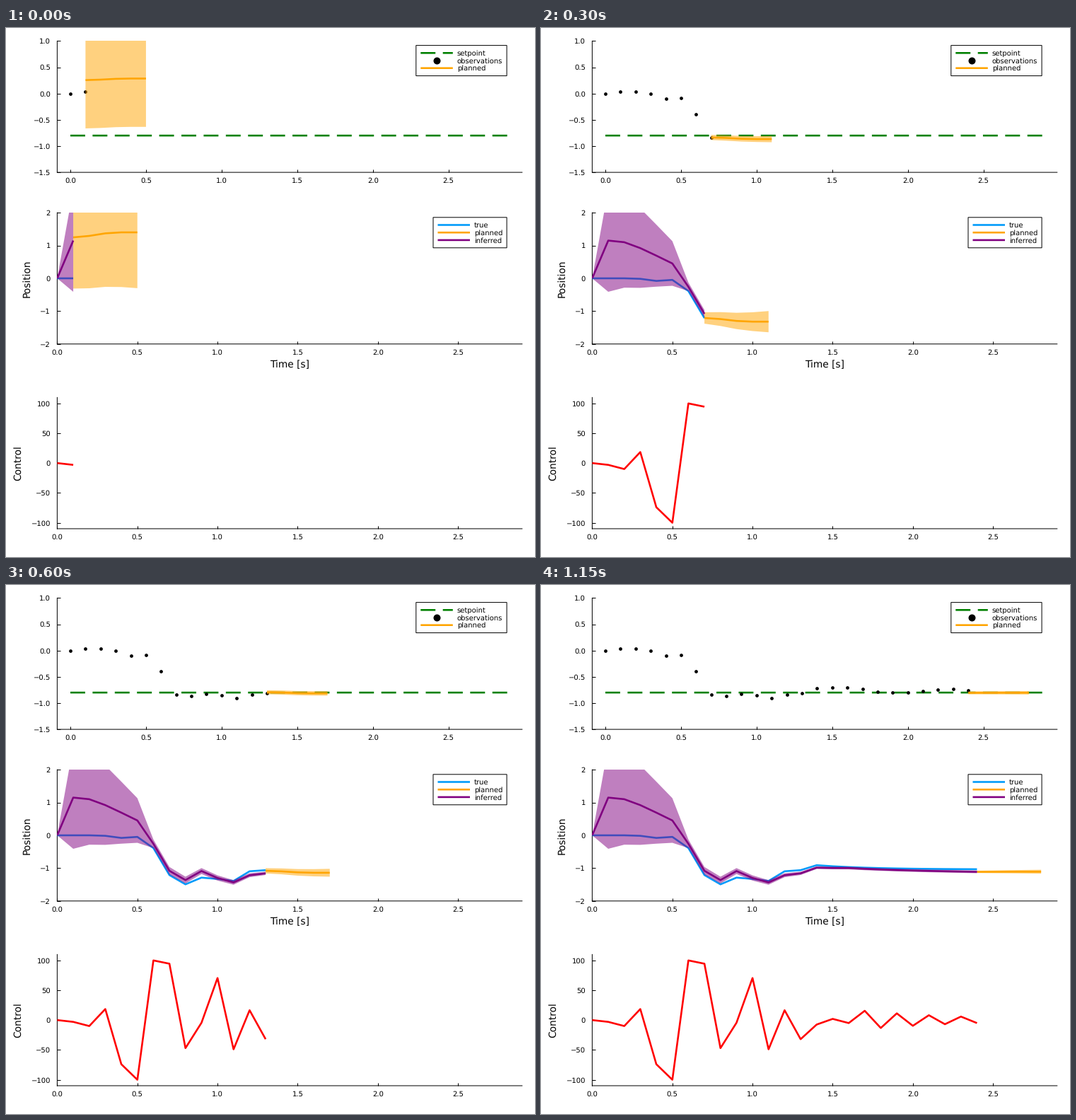
These frames come from a looping animation (748x748 px, 1.2 s). A matplotlib script:

```python
import numpy as np
import matplotlib.pyplot as plt
from matplotlib.animation import FuncAnimation
from matplotlib.patches import Rectangle

SIZE, DPI = 748, 64
PX = 72 / DPI  # points per pixel
LINE = 2.6 * PX
DASH = (0, (8.05, 4.03))
LEFT, RIGHT = 72.4, 729.8
BLUE = "#009afa"
FRAMES, HORIZON = 24, 5
GOAL = -1.04

plt.rcParams.update({
    "font.family": "DejaVu Sans",
    "font.size": 10 * PX,
    "text.hinting": "none",
    "path.snap": False,
    "lines.solid_capstyle": "butt",
    "lines.dash_capstyle": "butt",
})

steps = np.arange(FRAMES + 1)
times = steps / 10

# Strong corrections first, then an alternating, fading one.
kicks = [0, -3, -10, 18.5, -74, -100, 100, 94.5, -47, -4.5, 70.5, -49, 16.5, -32, -7.5, 2, -5]
control = np.r_[kicks, 15.6 * (-.85) ** np.arange(len(steps) - len(kicks))]


def drive(force, settle_from=14):
    """Position of a slightly damped mass that finally eases to the goal."""
    track, speed = [0, 0], 0
    for push in force[:settle_from - 2]:
        speed = .95 * speed + .005 * push
        track.append(track[-1] + speed)
    rest = np.arange(len(force) - settle_from)
    return np.r_[track, GOAL + .13 * .75 ** rest]


true_pos = drive(control)
observed = np.tanh(true_pos) + .04 * np.cos(2 * np.pi * (steps - 1.75) / 7)
inferred = true_pos + np.interp(steps, [0, 1, 2, 4, 5, 6, 8, 9, 10, 12, 16, 24],
                                [0, 1.15, 1.1, .77, .5, .13, .13, .2, .03, -.12, -.03, -.08])
spread = np.interp(steps, [0, 1, 3, 5, 6, 9, 14, 24], [0, 1.56, 1.21, .68, .13, .09, .04, .04])

# How the forecast narrows down as the loop goes on.
PLAN_KEYS = [0, 2, 4, 5, 8, 12, 16]
PLAN_END = [1.4, 1.18, -2.25, -1.35, -1.26, -1.14, -1.108]
HALF_START = [1.56, 1.23, .72, .2, .12, .08, .035]
HALF_END = [1.7, 1.44, 1.0, .35, .27, .12, .06]
CONFIDENCE = [.21, .23, .66, 1, 1, 1, 1]


def position_plan(frame):
    now, after = inferred[frame + 1], inferred[min(frame + 2, FRAMES)]
    start = now + .45 * (after - now) + max(0, .12 - .03 * frame)
    end, half_start, half_end = (np.interp(frame, PLAN_KEYS, row)
                                 for row in (PLAN_END, HALF_START, HALF_END))
    t = np.linspace(0, 1, HORIZON)
    s = np.minimum(t / .7, 1)
    ease = s * s * (3 - 2 * s)
    return start + (end - start) * ease, half_start + (half_end - half_start) * t


def height_plan(frame):
    mean, half = position_plan(frame)
    height = np.tanh(mean * np.interp(frame, PLAN_KEYS, CONFIDENCE))
    return height, np.minimum((1 - height**2) ** 1.5 * half + .02, .92)


def make_axes(top, bottom, xlim, ylim, yticks, form):
    ax = fig.add_axes([LEFT / SIZE, 1 - bottom / SIZE,
                       (RIGHT - LEFT) / SIZE, (bottom - top) / SIZE])
    ax.set(xlim=xlim, ylim=ylim, facecolor="none")
    ax.set_axisbelow(True)
    ax.set_xticks(np.arange(6) / 2, [f"{v / 2:.1f}" for v in range(6)])
    ax.set_yticks(yticks, [format(v, form).replace("-", "\u2212") for v in yticks])
    ax.tick_params(direction="in", length=4.5 * PX, width=PX)
    ax.tick_params(axis="x", pad=7.4 * PX)
    ax.tick_params(axis="y", pad=9.5 * PX)
    ax.spines[["top", "right"]].set_visible(False)
    for side in ("left", "bottom"):
        ax.spines[side].set(linewidth=PX, zorder=.4)
    return ax


def label(x, y, text, rotation=0):
    fig.text(x / SIZE, 1 - y / SIZE, text, size=13.75 * PX, rotation=rotation,
             ha="center", va="center")


def legend(x, y, width, entries):
    overlay.add_patch(Rectangle((x, y), width, 43, fc="white", ec="black", lw=PX))
    for row, (name, color, style) in enumerate(entries):
        mid = y + 10.7 * (row + 1)
        if style == "dot":
            overlay.plot(x + 29.3, mid, "o", color=color, ms=10 * PX, mew=0)
        else:
            overlay.plot([x + 6.5, x + 52], [mid, mid], color=color, lw=LINE, ls=style)
        overlay.text(x + 58, mid + 3.6, name, va="baseline")


def make_band(ax, color, z):
    return ax.fill([0, 0, 0], [0, 0, 0], color=color, alpha=.5, lw=0, zorder=z)[0]


def make_line(ax, color, z):
    return ax.plot([], [], color=color, lw=LINE, zorder=z)[0]


def set_band(band, x, mean, half):
    band.set_xy(np.c_[np.r_[x, x[::-1]], np.r_[mean - half, (mean + half)[::-1]]])


fig = plt.figure(figsize=(SIZE / DPI, SIZE / DPI), dpi=DPI, facecolor="white")

height_ax = make_axes(18.4, 204.1, (-.087, 2.987), (-1.5, 1), np.arange(-3, 3) / 2, ".1f")
position_ax = make_axes(261.1, 446.8, (0, 2.9), (-2, 2), range(-2, 3), "d")
control_ax = make_axes(522.4, 708, (0, 2.9), (-110, 110), range(-100, 101, 50), "d")
label(29.5, 354.5, "Position", 90)
label(17, 615.5, "Control", 90)
label(401.5, 476.5, "Time [s]")

overlay = fig.add_axes([0, 0, 1, 1])
overlay.set(xlim=(0, SIZE), ylim=(SIZE, 0))
overlay.axis("off")
legend(579.8, 24.6, 128.3, [("setpoint", "green", DASH), ("observations", "black", "dot"),
                            ("planned", "orange", "-")])
legend(604, 267.8, 104.1, [("true", BLUE, "-"), ("planned", "orange", "-"),
                           ("inferred", "purple", "-")])

height_ax.plot([0, 2.9], [-.8, -.8], color="green", lw=LINE, ls=DASH, zorder=2)
dots, = height_ax.plot([], [], "o", color="black", ms=4.8 * PX, mew=0, zorder=3)
height_band = make_band(height_ax, "orange", 4)
height_line = make_line(height_ax, "orange", 5)

true_line = make_line(position_ax, BLUE, 2)
plan_band = make_band(position_ax, "orange", 3)
plan_line = make_line(position_ax, "orange", 4)
inferred_band = make_band(position_ax, "purple", 5)
inferred_line = make_line(position_ax, "purple", 6)

control_line = make_line(control_ax, "red", 2)


def update(frame):
    n = frame + 2
    past = times[:n]
    ahead = (frame + 1 + np.arange(HORIZON)) / 10

    for line, values in ((dots, observed), (true_line, true_pos),
                         (inferred_line, inferred), (control_line, control)):
        line.set_data(past, values[:n])
    set_band(inferred_band, past, inferred[:n], spread[:n])

    for band, line, plan in ((height_band, height_line, height_plan),
                             (plan_band, plan_line, position_plan)):
        mean, half = plan(frame)
        set_band(band, ahead, mean, half)
        line.set_data(ahead, mean)
    return []


anim = FuncAnimation(fig, update, frames=FRAMES, interval=50, repeat=True)
plt.show()
```
